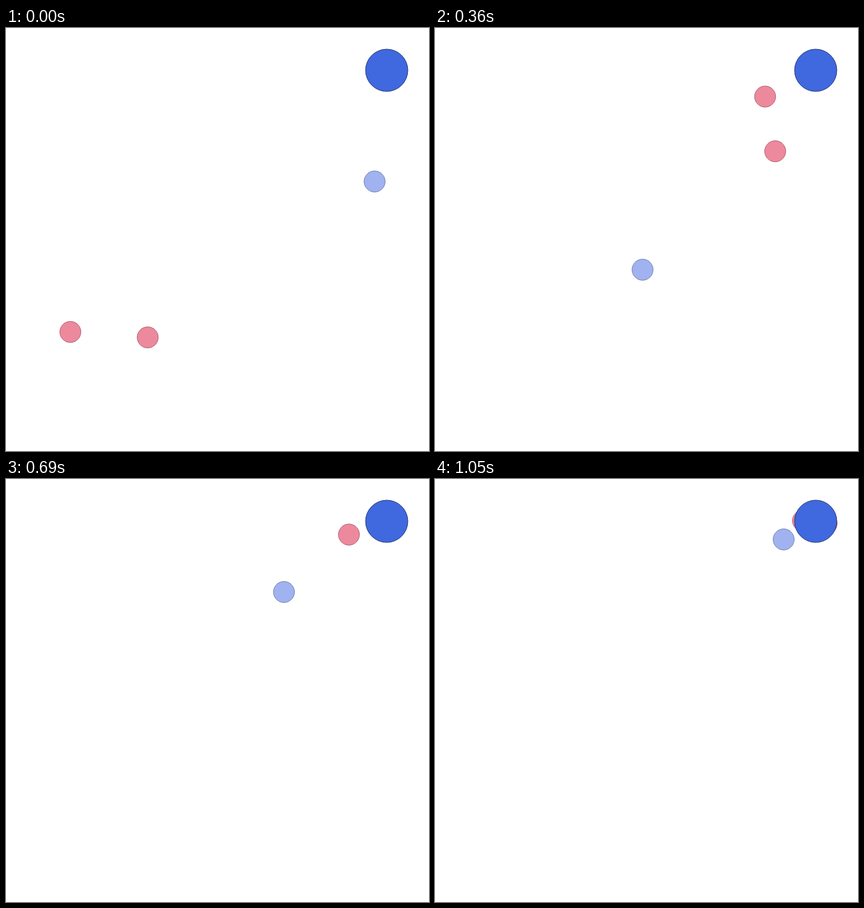
An HTML page with a canvas for the animation above (1.08 s loop, 700 px wide and 700 px high).

```html
<!DOCTYPE html>
<html>
<head>
<meta charset="utf-8">
<style>
html, body { margin: 0; width: 100%; height: 100%; overflow: hidden; background: #fff; }
canvas { display: block; }
</style>
</head>
<body>
<canvas id="stage" width="700" height="700"></canvas>
<script>
const ctx = document.getElementById('stage').getContext('2d');
const STEP = 30, STEPS = 36, KEEP = 0.75, COLLISION = 27;
const RED = ['#ed899d', 'rgba(110,10,30,.5)'];
const BLUE = ['#a0b2ef', 'rgba(32,52,112,.5)'];

// Steps at which every agent reaches its next waypoint.
const times = [0, 5, 12, 16, 19, 23, COLLISION, 31, 35];

// Damped motion: between waypoints a constant push, chosen to arrive on time.
function simulate(goals) {
  const track = [goals[0]];
  let speed = 0, pos = goals[0];
  for (let i = 1; i < goals.length; i++) {
    const steps = times[i] - times[i - 1];
    const coast = KEEP * (1 - KEEP ** steps) / (1 - KEEP);
    const reach = (steps - coast) / (1 - KEEP);
    if (times[i - 1] === COLLISION) speed = 0;
    const push = (goals[i] - pos - speed * coast) / reach;
    for (let k = 0; k < steps; k++) {
      speed = speed * KEEP + push;
      track.push(pos += speed);
    }
  }
  return track;
}

const agent = (colors, xs, ys) => ({ colors, x: simulate(xs), y: simulate(ys) });

const agents = [
  agent(RED, [106.5, 301.3, 546.3, 562, 561, 567.5, 588, 603, 609],
             [503, 295.2, 113.5, 102, 99, 92, 97, 77, 69]),
  agent(RED, [234.5, 301.8, 563, 666, 645, 630, 634, 671, 648],
             [512, 386.7, 204, 122, 70, 64, 66, 53, 74]),
  agent(BLUE, [610, 471, 343.5, 363, 394.5, 460, 548.5, 570, 577],
              [254, 343.5, 400, 353, 285, 187, 112, 108, 100])
];

function disc(x, y, radius, fill, stroke) {
  ctx.beginPath();
  ctx.arc(x, y, radius, 0, Math.PI * 2);
  ctx.fillStyle = fill;
  ctx.fill();
  ctx.strokeStyle = stroke;
  ctx.stroke();
}

function draw() {
  const step = Math.floor(performance.now() / STEP) % STEPS;
  ctx.clearRect(0, 0, 700, 700);
  for (const { colors, x, y } of agents) disc(x[step], y[step], 17.5, ...colors);
  disc(630, 70, 35, '#4068df', '#203470');
  requestAnimationFrame(draw);
}
draw();
</script>
</body>
</html>
```
